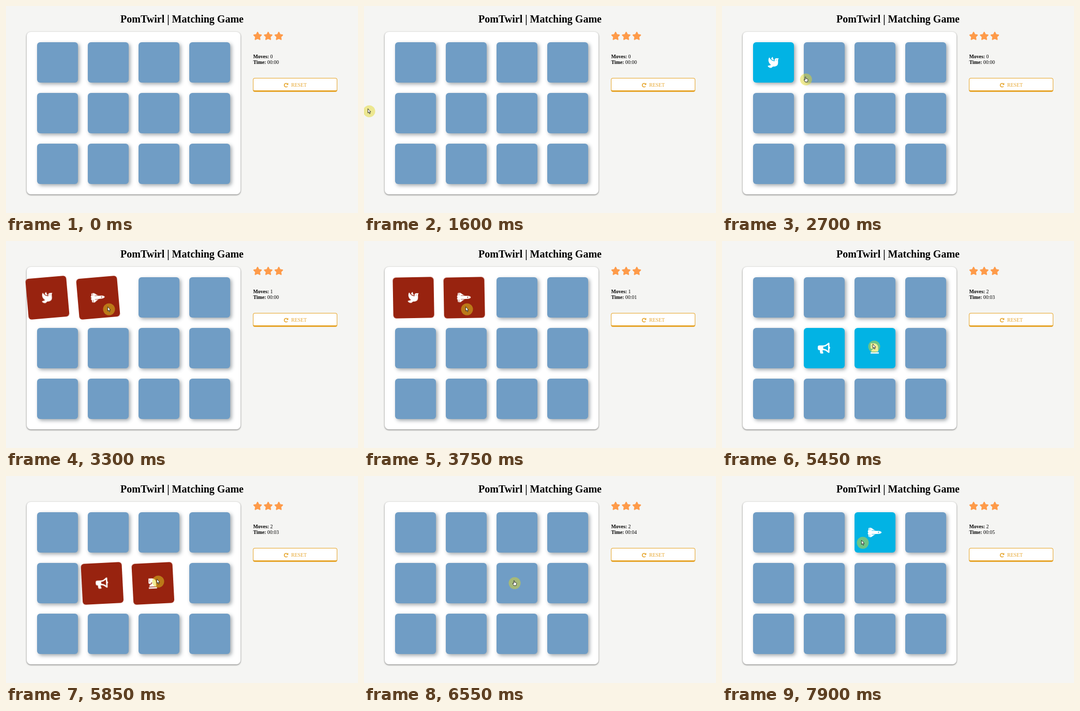
Recreate the animation shown at these times as an HTML page. Size 680 by 400 pixels, loop 8 s.

```html
<!DOCTYPE html>
<html lang="en">
<head>
<meta charset="utf-8">
<title>Matching Game</title>
<style>
  html, body { margin: 0; width: 100%; height: 100%; overflow: hidden; }
  body {
    position: relative;
    background: #f5f5f3;
    color: #000;
    font: 9.8px/11px "Liberation Serif", "Times New Roman", serif;
  }
  #stage { position: absolute; left: 0; top: 0; width: 680px; height: 400px; overflow: hidden; }
  #stage > * { position: absolute; }
  svg { display: block; overflow: visible; }
  h1 {
    left: 0; top: 13px; width: 680px; margin: 0;
    font-size: 20px; line-height: 24px; text-align: center;
  }
  .deck {
    left: 40px; top: 50px; width: 413px; height: 314px;
    border-radius: 8px; background: #fff;
    box-shadow: 0 1px 3px rgba(0, 0, 0, .55);
  }
  .card {
    position: absolute; width: 78.5px; height: 78.5px;
    border-radius: 6px; background: #709dc5;
    box-shadow: 3px 3px 7px rgba(46, 61, 73, .45);
  }
  .card svg { position: absolute; left: 50%; top: 50%; display: none; fill: #fff; fill-rule: evenodd; }
  .card.open { background: #02b3e4; }
  .card.open svg { display: block; }
  .card.bad { background: #98230f; box-shadow: none; animation: wobble 750ms paused both; }
  @keyframes wobble {
    0%, 100% { transform: none; }
    15% { transform: translateX(-25%) rotate(-5deg); }
    30% { transform: translateX(20%) rotate(3deg); }
    45% { transform: translateX(-15%) rotate(-3deg); }
    60% { transform: translateX(10%) rotate(2deg); }
    75% { transform: translateX(-5%) rotate(-1deg); }
  }
  #stars { left: 486px; top: 58px; fill: #fe9b4a; stroke: #fe9b4a; stroke-width: 2.4; stroke-linejoin: round; }
  .stats { left: 477.5px; top: 92px; white-space: pre; }
  .reset {
    box-sizing: border-box; left: 477px; top: 139px; width: 163px; height: 27px;
    border: 1px solid #e6a52c; border-bottom-width: 3px; border-radius: 4px;
    background: #fff;
  }
  .reset span { position: absolute; left: 73px; top: 7px; color: #e6a52c; }
  .reset svg { position: absolute; left: 62.5px; top: 12.5px; fill: none; stroke: #e6a52c; stroke-width: 1.6; }
  #pointer { left: 0; top: 0; }
</style>
</head>
<body>
<div id="stage">
  <h1>PomTwirl | Matching Game</h1>
  <div class="deck" id="deck"></div>
  <svg id="stars" width="1" height="1"></svg>
  <div class="stats"><b>Moves:</b> <span id="moves">0</span>
<b>Time:</b> <span id="time">00:00</span></div>
  <div class="reset">
    <svg width="1" height="1">
      <path d="M2.6-2.4A3.5 3.5 0 1 0 2.8 2.2"/>
      <path d="M4.3-4.4V-.6H.5Z" fill="#e6a52c" stroke="none"/>
    </svg>
    <span>RESET</span>
  </div>
  <svg id="pointer" width="1" height="1">
    <circle r="11.5" fill="rgba(225,215,35,.48)"/>
    <circle id="ring" cx="-2.5" cy="-3.5" r="3.6" fill="none" stroke="#b5702c"/>
    <path id="arrow" d="M-2.6-5V3.2L-.8 1.6L.6 4.8L1.9 4.2L.6 1.2H3Z" fill="#fff" stroke="#111" stroke-width=".8"/>
    <path id="hand" d="M-1.8-4.6Q-.9-5.6-.2-4.4V-1.6L3-.9Q4-.5 3.8.8L2.8 4.8H-1.3L-3.8 1Q-3.8-.3-2.7 0L-1.8 1Z" fill="#fff" stroke="#111" stroke-width=".8"/>
  </svg>
</div>
<script>
const LOOP = 8000;
const SIZE = 78.5, PITCH = 98.1;
const $ = id => document.getElementById(id);

// Icons sit on a 512-unit em; w is their width.
const icons = {
  dove: { w: 512, d: `M288 167V139Q245 83 234 14C232 0 215-5 206 6Q174 43 157 92Q211 152 288 167Z
    M400 64Q320 68 320 144V203C215 197 127 133 87 42C81 29 64 28 58 41C0 165 45 292 156 375L12 411
    Q-4 418 3 436Q50 508 156 512Q168 512 178 504L243 448H320Q470 440 480 288V128L512 64Z
    M400 160a16 16 0 1 1 .1 0Z` },
  shuttle: { w: 640, d: `M593 208Q543 184 472 184H186L170 168H376C229 138 219 32 96 32V160H80V32
    Q32 38 32 96V160Q0 160 0 184V224Q0 248 32 248V264Q0 264 0 288V328Q0 352 32 352V416
    Q34 474 80 480V352H96V480C219 480 229 374 376 344H170L186 328H472Q543 328 593 304Q687 256 593 208Z
    M488 296Q480 296 480 288V224Q480 216 488 216C520 216 520 296 488 296Z` },
  horn: { w: 576, d: `M576 240Q575 204 544 185V32Q538-10 492 7L407 75Q341 128 256 128H64Q4 132 0 192V288
    Q4 348 64 352H98Q86 425 121 495Q130 512 150 512H224C250 512 265 482 250 461Q212 410 228 352H256
    Q341 352 407 405L492 473Q538 490 544 448V295Q575 276 576 240Z
    M480 381L447 355Q364 288 256 288V192Q364 192 447 125L480 99Z` },
  knight: { w: 384, d: `M19 272L60 291Q72 296 84 291L97 286Q111 280 116 265L125 235Q129 223 138 219L160 208V258
    Q158 288 133 301L76 330Q32 352 32 401V416H352V224C352 118 266 32 160 32H12Q-4 36 2 52L16 80L7 89
    Q0 97 0 106V243Q0 267 19 272ZM52 128a20 20 0 1 1-.1 0Z
    M368 448H16Q0 448 0 464V496Q0 512 16 512H368Q384 512 384 496V464Q384 448 368 448Z` }
};

const turns = [
  { card: 0, icon: 'dove', open: 2450, bad: 3188, close: 4000 },
  { card: 1, icon: 'shuttle', open: 2900, bad: 3188, close: 4000 },
  { card: 5, icon: 'horn', open: 4700, bad: 5512, close: 6325 },
  { card: 6, icon: 'knight', open: 5200, bad: 5512, close: 6325 },
  { card: 2, icon: 'shuttle', open: 7850, bad: Infinity, close: Infinity }
];
const moveTimes = [2900, 5200];
const timerStart = 2450;

// Pointer stops: time, x, y
const path = [
  [1400, -14, 224], [1850, 40, 178], [2250, 92, 130], [2400, 106, 122], [2500, 108, 123],
  [2700, 162, 142], [2850, 199, 132], [4100, 199, 132], [4500, 219.5, 194], [5000, 219.5, 194],
  [5200, 294, 204], [6300, 294, 204], [6400, 291, 207], [6600, 291, 207], [6850, 287, 262],
  [7100, 279, 142], [7500, 272, 129], [LOOP, 272, 129]
];

const cards = Array.from({ length: 12 }, (_, i) => {
  const el = document.createElement('div');
  const x = 60 + (i % 4) * PITCH, y = 69.5 + Math.floor(i / 4) * PITCH;
  el.style.left = x - 40 + 'px';
  el.style.top = y - 50 + 'px';
  $('deck').append(el);
  return { el, x, y };
});

for (const { card, icon } of turns) {
  const { w, d } = icons[icon];
  cards[card].el.innerHTML =
    `<svg width="1" height="1"><path transform="scale(.0415) translate(${-w / 2} -256)" d="${d}"/></svg>`;
}

const star = Array.from({ length: 10 }, (_, i) => {
  const r = i % 2 ? 3.7 : 7.4, a = (i / 5 - .5) * Math.PI;
  return [r * Math.cos(a), r * Math.sin(a)];
}).join(' ');
$('stars').innerHTML = [0, 20.5, 41]
  .map(x => `<polygon points="${star}" transform="translate(${x} .5)"/>`).join('');

function pointerAt(t) {
  const i = path.findIndex(p => p[0] > t);
  if (i < 1) return path[0].slice(1);
  const [t0, x0, y0] = path[i - 1], [t1, x1, y1] = path[i];
  const k = (t - t0) / (t1 - t0);
  return [x0 + (x1 - x0) * k, y0 + (y1 - y0) * k];
}

const show = (id, on) => { $(id).style.display = on ? '' : 'none'; };

function render(t) {
  const active = new Map(turns.filter(s => t >= s.open && t < s.close).map(s => [s.card, s]));
  cards.forEach(({ el }, i) => {
    const s = active.get(i);
    const bad = s && t >= s.bad;
    el.className = 'card' + (s ? ' open' : '') + (bad ? ' bad' : '');
    el.style.animationDelay = bad ? s.bad - t + 'ms' : '';
  });

  $('moves').textContent = moveTimes.filter(m => t >= m).length;
  const secs = Math.max(0, Math.floor((t - timerStart) / 1000));
  $('time').textContent = '00:' + String(secs).padStart(2, '0');

  const [x, y] = pointerAt(t);
  const hand = cards.some((c, i) => !active.has(i) &&
    x >= c.x && x <= c.x + SIZE && y >= c.y && y <= c.y + SIZE);
  $('pointer').style.transform = `translate(${x}px, ${y}px)`;
  show('pointer', t >= path[0][0]);
  show('hand', hand);
  show('arrow', !hand);
  show('ring', turns.some(s => t >= s.open && t < s.open + 45));
}

const start = performance.now();
function tick() {
  render((performance.now() - start) % LOOP);
  requestAnimationFrame(tick);
}
tick();
</script>
</body>
</html>
```
